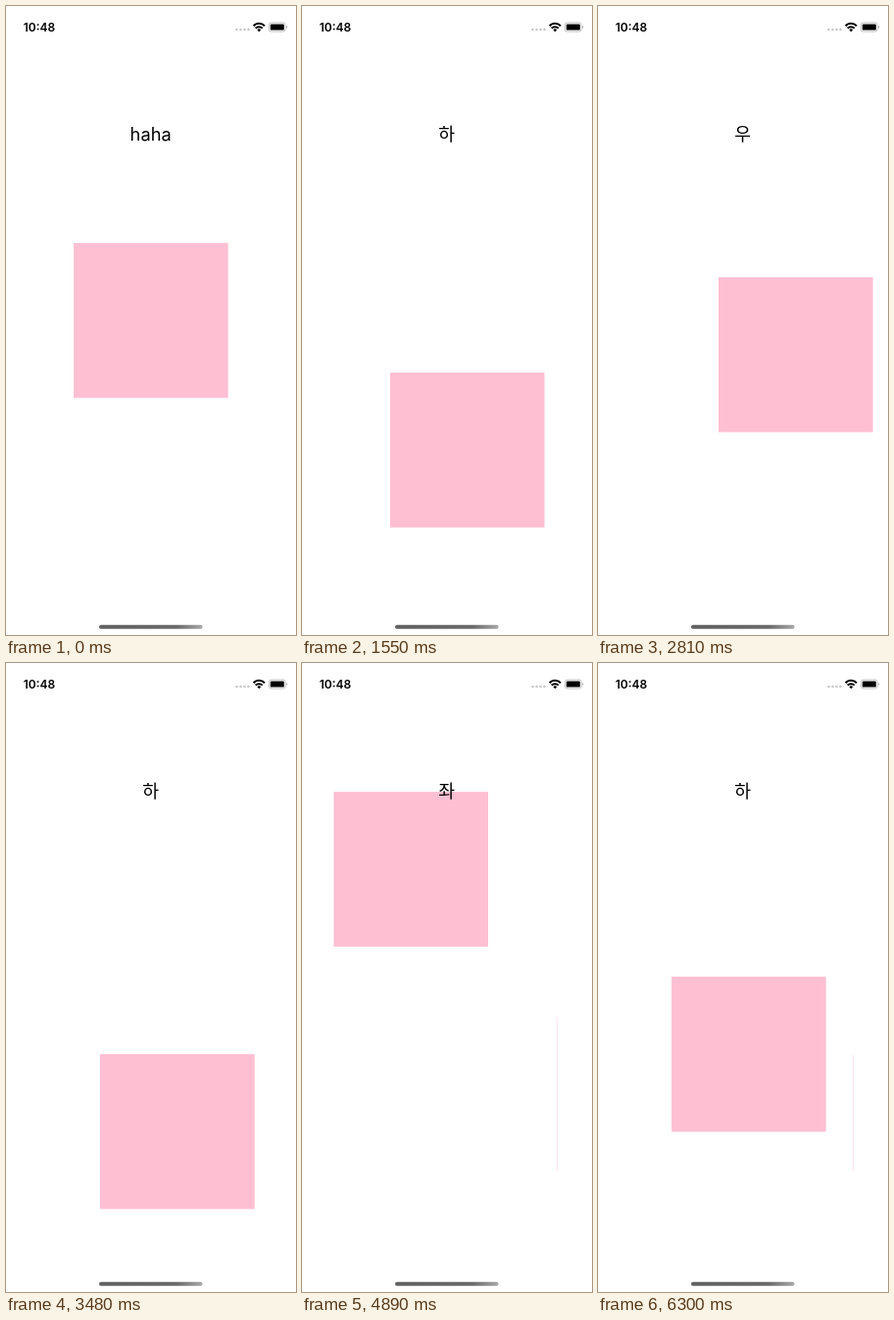
An HTML page for the animation above (6380 ms loop, 296 by 640 pixels).

```html
<!DOCTYPE html>
<html lang="ko">
<head>
<meta charset="utf-8">
<title>Drag direction</title>
<style>
  html, body { margin: 0; width: 100%; height: 100%; overflow: hidden; background: #fff; }
  svg { display: block; width: 296px; height: 640px; }
  .clock { font: 600 12px Inter, sans-serif; }
  .wifi { fill: none; stroke: #000; stroke-width: 2; }

  .box, .trail, .label::before { animation: 6380ms steps(1) infinite; }
  .box { fill: #febfd2; animation-name: drag; }
  .trail { fill: #ffe6ed; animation-name: trail; }
  .label {
    position: absolute; top: 119px; left: 0; width: 295.4px;
    font: 18.3px/22px Inter, "Noto Sans CJK KR", "Noto Sans CJK", sans-serif;
    text-align: center;
  }
  .label::before { content: "haha"; animation-name: direction; }

  /* The box follows the finger in a few steps and jumps home on release. */
  @keyframes drag {
    0%, 20.53%, 30.72%, 51.09%, 66.92%, 82.44%, 93.57%, 100% { translate: 69.1px 241.1px; }

    11.59% { translate: 69px 228px; animation-timing-function: steps(4); }
    18.65% { translate: 74px 121px; }

    20.53% { animation-timing-function: steps(2); }
    24.29% { translate: 89.9px 373px; animation-timing-function: steps(2); }
    28.99% { translate: 91px 406px; }

    30.72% { animation-timing-function: steps(3); }
    36.05% { translate: 0 293.4px; }

    40.59% { translate: 2px 296px; animation-timing-function: steps(2); }
    44.04% { translate: 123px 276px; }
    49.37% { translate: 134px 272px; }

    51.09% { animation-timing-function: steps(2); }
    54.54% { translate: 96.1px 398px; animation-timing-function: steps(2); }
    58.3%  { translate: 94px 438px; }

    61.44% { translate: 103px 424px; animation-timing-function: steps(2); }
    65.04% { translate: 99.7px 276.6px; }
    68.65% { translate: 91px 120px; }
    74.76% { translate: 92px 114px; }
    76.64% { translate: 32.4px 131.1px; }

    84.48% { translate: 113px 241px; }
    91.84% { translate: 120px 241px; }

    93.57% { animation-timing-function: steps(3); }
    98.74% { translate: 75.1px 319.2px; }
  }

  @keyframes direction {
    0%, 100% { content: "haha"; }
    11.59%, 61.44% { content: "상"; }
    20.53%, 51.09%, 93.57% { content: "하"; }
    30.72%, 76.64% { content: "좌"; }
    40.59%, 82.44% { content: "우"; }
  }

  @keyframes trail {
    0%, 100% { y: 360px; height: 0; }
    65.04% { y: 360px; height: 157px; }
    84.48% { y: 399px; height: 118px; }
  }
</style>
</head>
<body>
<svg viewBox="0 0 296 640">
  <defs>
    <linearGradient id="bar">
      <stop offset="0" stop-color="#606060"/>
      <stop offset=".75" stop-color="#6a6a6a"/>
      <stop offset="1" stop-color="#a8a8a8"/>
    </linearGradient>
  </defs>

  <rect class="trail" x="260" width="1"/>
  <rect class="box" width="157.6" height="157.6"/>

  <text class="clock" x="17.7" y="26">10:48</text>
  <g fill="#c8c8c8">
    <circle cx="235.5" cy="24" r="1.3"/>
    <circle cx="239.5" cy="24" r="1.3"/>
    <circle cx="243.5" cy="24" r="1.3"/>
    <circle cx="247.5" cy="24" r="1.3"/>
  </g>
  <g class="wifi">
    <path d="M252.6 20.2a8 8 0 0 1 11.4 0"/>
    <path d="M254.8 22.6a4.9 4.9 0 0 1 7 0"/>
  </g>
  <path d="M258.3 26.2l-1.9-2a2.7 2.7 0 0 1 3.8 0z"/>
  <rect x="268.4" y="17" width="16.8" height="9" rx="2.4" fill="none" stroke="#b0b0b0" stroke-width=".8"/>
  <rect x="269.8" y="18.4" width="14" height="6.2" rx="1.2"/>
  <path d="M286.2 20v3a1.6 1.6 0 0 0 0-3z" fill="#b0b0b0"/>

  <rect x="95" y="629.8" width="105.6" height="3.9" rx="1.95" fill="url(#bar)"/>
</svg>
<div class="label"></div>
</body>
</html>
```
